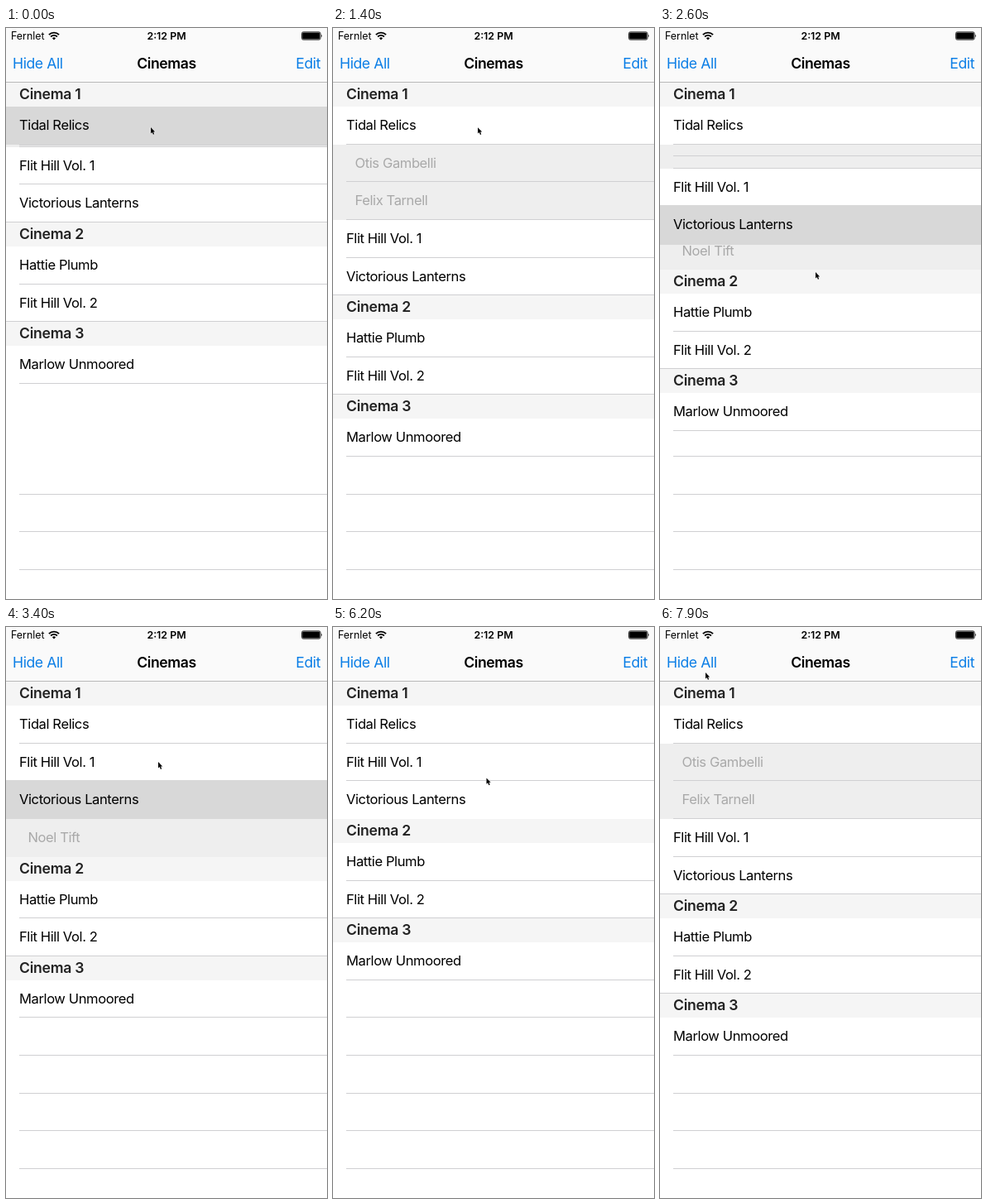
Recreate the animation shown at these times as an HTML page. Size 388x690 px, loop 8 s.

```html
<!DOCTYPE html>
<html lang="en">
<head>
<meta charset="utf-8">
<title>Cinemas</title>
<style>
  html, body { margin: 0; width: 100%; height: 100%; overflow: hidden; background: #fff; }
  #stage {
    position: relative; width: 388px; height: 690px; overflow: hidden; background: #fff;
    font-family: Inter, "Liberation Sans", sans-serif; color: #000; white-space: nowrap;
  }
  #stage div, #stage svg { position: absolute; }
  .bar { left: 0; top: 0; width: 388px; height: 65px; background: #fafafa; border-bottom: 1px solid #b9b9b9; z-index: 20; }
  .status { top: 2px; line-height: 16px; font-size: 12.4px; }
  .nav { top: 32px; line-height: 22px; font-size: 17.6px; letter-spacing: -.42px; color: #0b7ee6; }
  .center { left: 0; width: 388px; text-align: center; font-weight: 600; color: #000; }
  .row { left: 0; width: 388px; height: 45.6px; line-height: 44px; font-size: 16.56px; letter-spacing: -.4px; }
  .film { background: #fff; z-index: 10; }
  .actor { background: #eee; color: #a9a9a9; }
  .head {
    left: 0; width: 388px; height: 29px; line-height: 28px; background: #f5f5f5; z-index: 11;
    font-size: 17.6px; font-weight: 600; letter-spacing: -.25px; color: #222;
  }
  .label { left: 16px; top: 0; }
  .actor .label { left: 26.5px; }
  .line { left: 16px; right: 0; bottom: 0; height: 1px; background: #d0d0d2; }
  .full { left: 0; }
  .shade { left: 0; right: 0; top: -1px; bottom: -.5px; background: #d8d8d8; opacity: 0; }
  .empty { bottom: auto; top: 0; }
  #cursor { left: 0; top: -1px; z-index: 30; }
</style>
</head>
<body>
<div id="stage">
  <div class="bar">
    <div class="status" style="left:6px">Fernlet</div>
    <svg style="left:51px;top:4px" width="14" height="11" viewBox="0 0 14 11" fill="none" stroke="#000" stroke-width="1.9">
      <path d="M.9 4.2a8.6 8.6 0 0 1 12.2 0M3.1 6.5a5.5 5.5 0 0 1 7.8 0"/>
      <path d="M7 10.4L4.9 8.3a3 3 0 0 1 4.2 0z" fill="#000" stroke="none"/>
    </svg>
    <div class="status center">2:12 PM</div>
    <svg style="left:357px;top:4px" width="27" height="11" viewBox="0 0 27 11">
      <rect x=".5" y=".8" width="22.6" height="9.4" rx="1.8" fill="none" stroke="#000" stroke-width=".8"/>
      <rect x="1.2" y="1.5" width="21.2" height="8" rx="1"/>
      <path d="M24.2 3.6q1.6 1.9 0 3.8z"/>
    </svg>
    <div class="nav" style="left:8px">Hide All</div>
    <div class="nav center">Cinemas</div>
    <div class="nav" style="right:8px">Edit</div>
  </div>
  <svg id="cursor" width="8" height="12" viewBox="-1 -1 8 12">
    <path d="M0 0V7.4L1.7 5.9L2.9 8.8L4.2 8.2L3 5.4H5.2Z" fill="#000" stroke="#fff" stroke-width=".9" paint-order="stroke"/>
  </svg>
</div>
<script>
const LOOP = 8000, TOP = 66.2, HEAD = 29, ROW = 45.6;
const stage = document.getElementById("stage");
const cursor = document.getElementById("cursor");

function add(parent, cls, text = "") {
  const el = document.createElement("div");
  el.className = cls;
  el.textContent = text;
  return parent.appendChild(el);
}

function addRow(kind, text, lineCls = "line") {
  const el = add(stage, "row " + kind);
  el.line = add(el, lineCls);
  el.shade = add(el, "shade");
  add(el, "label", text);
  return el;
}

function addHead(text) {
  const el = add(stage, "head");
  add(el, "label", text);
  return el;
}

const head1 = addHead("Cinema 1");
const relics = addRow("film", "Tidal Relics");
const otis = addRow("actor", "Otis Gambelli");
const felix = addRow("actor", "Felix Tarnell");
const hill1 = addRow("film", "Flit Hill Vol. 1");
const lanterns = addRow("film", "Victorious Lanterns", "line full");
const noel = addRow("actor", "Noel Tift");
const head2 = addHead("Cinema 2");
const hattie = addRow("film", "Hattie Plumb");
const hill2 = addRow("film", "Flit Hill Vol. 2", "line full");
const head3 = addHead("Cinema 3");
const marlow = addRow("film", "Marlow Unmoored");
const empties = Array.from({ length: 6 }, () => add(stage, "line empty"));

otis.style.zIndex = noel.style.zIndex = 4;
felix.style.zIndex = 3;
noel.line.style.display = "none";

// Start times of the row animations.
const SWAP = 2414, CLOSE = 4080, REOPEN = 7050, SPAN = 300;

// Each table lists [time, value, ...].
const firstOpen = [[-32, 0], [268, 1], [SWAP, 1], [SWAP + SPAN, 0], [REOPEN, 0], [REOPEN + SPAN, 1]];
const secondOpen = [[SWAP, 0], [SWAP + SPAN, 1], [CLOSE, 1], [CLOSE + SPAN, 0]];
const firstShade = [[0, 1], [300, 1], [600, 0], [6899, 0], [6900, 1], [7400, 1], [7700, 0]];
const secondShade = [[2299, 0], [2300, 1], [4400, 1], [4700, 0]];
const pointer = [
  [1400, 174, 120], [2200, 187, 295], [3050, 187, 295], [3400, 183, 163],
  [3900, 187, 205], [5950, 187, 205], [6850, 178, 124], [7450, 178, 124],
  [7700, 88, 80], [7800, 70, 66], [7900, 54, 55]
];

const linear = u => u;
const smooth = u => u * u * (3 - 2 * u);

function sample(table, t, ease, col = 1) {
  const i = table.findIndex(k => k[0] > t);
  if (i === 0) return table[0][col];
  if (i < 0) return table[table.length - 1][col];
  const a = table[i - 1], b = table[i];
  return a[col] + (b[col] - a[col]) * ease((t - a[0]) / (b[0] - a[0]));
}

function place(el, y) { el.style.top = y + "px"; }

function draw(t) {
  const p = sample(firstOpen, t, smooth);
  const q = sample(secondOpen, t, smooth);
  let y = TOP;
  const stack = (el, h) => { place(el, y); y += h; };

  stack(head1, HEAD);
  place(otis, y + ROW * p);
  place(felix, y + 2 * ROW * p);
  stack(relics, ROW);
  y += 2 * ROW * p;
  stack(hill1, ROW);
  place(noel, y + ROW * q);
  stack(lanterns, ROW);
  y += ROW * q;
  stack(head2, HEAD);
  stack(hattie, ROW);
  stack(hill2, ROW);
  stack(head3, HEAD);
  stack(marlow, ROW);

  // Blank separators jump straight to the layout being animated to.
  const extra = t < SWAP ? 2 : t < CLOSE ? 1 : t < REOPEN ? 0 : 2;
  const base = TOP + 3 * HEAD + (6 + extra) * ROW - 1;
  empties.forEach((el, k) => place(el, base + (k + 1) * ROW));

  lanterns.line.style.opacity = t < SWAP || t >= REOPEN ? 1 : 0;
  relics.shade.style.opacity = sample(firstShade, t, linear);
  lanterns.shade.style.opacity = sample(secondShade, t, linear);

  const cx = sample(pointer, t, linear, 1), cy = sample(pointer, t, linear, 2);
  cursor.style.transform = `translate(${cx}px, ${cy}px)`;
}

const start = performance.now();
function tick() {
  draw((performance.now() - start) % LOOP);
  requestAnimationFrame(tick);
}
tick();
</script>
</body>
</html>
```
